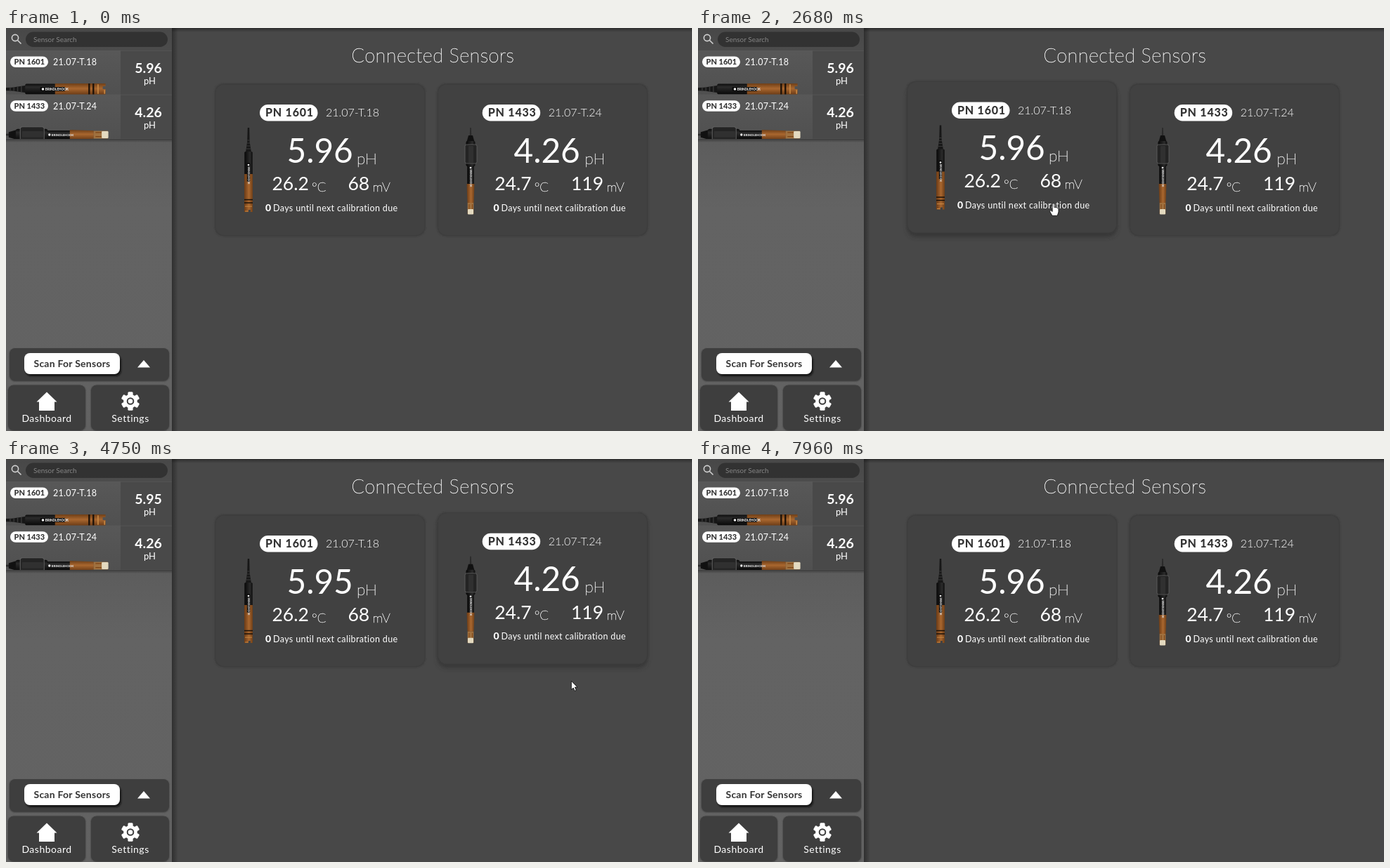
Write an HTML page that moves like this. It is 976 by 574 pixels and loops after 8000 ms.

```html
<!DOCTYPE html>
<html lang="en">
<head>
<meta charset="utf-8">
<title>Connected Sensors</title>
<style>
html, body { margin: 0; height: 100%; overflow: hidden; background: #484848; }
svg { display: block; width: 976px; height: 574px; font-family: Lato, sans-serif; fill: #fff; }
</style>
</head>
<body>
<svg id="stage" viewBox="0 0 976 574" xmlns="http://www.w3.org/2000/svg"></svg>
<script>
const LOOP = 8000, LIFT = 3.7, HOVER_MS = 500;

const text = (x, y, size, weight, str, extra = '') =>
  `<text x="${x}" y="${y}" font-size="${size}" font-weight="${weight}" ${extra}>${str}</text>`;
const thin = (x, y, size, str, extra = '') =>
  text(x, y, size, 200, str, 'stroke="#fff" stroke-width=".45" ' + extra);
const box = (x, y, w, h, r, fill, extra = '') =>
  `<rect x="${x}" y="${y}" width="${w}" height="${h}" rx="${r}" fill="${fill}" ${extra}/>`;
const spaced = n => `letter-spacing="${n}"`;

const defs = `<defs>
  <linearGradient id="side" x2="0" y2="1">
    <stop offset="0" stop-color="#484848"/><stop offset=".27" stop-color="#5c5c5c"/>
    <stop offset=".45" stop-color="#636363"/><stop offset="1" stop-color="#626262"/>
  </linearGradient>
  <linearGradient id="item" x2="0" y2="1">
    <stop offset="0" stop-color="#585858"/><stop offset="1" stop-color="#505050"/>
  </linearGradient>
  <linearGradient id="edge"><stop stop-color="#000" stop-opacity=".35"/><stop offset="1" stop-opacity="0"/></linearGradient>
  <linearGradient id="down" x2="0" y2="1"><stop stop-color="#000" stop-opacity=".35"/><stop offset="1" stop-opacity="0"/></linearGradient>
  <linearGradient id="amber" x2="0" y2="1">
    <stop offset="0" stop-color="#6f3f18"/><stop offset=".45" stop-color="#a9672f"/><stop offset="1" stop-color="#6b3b16"/>
  </linearGradient>
  <linearGradient id="black" x2="0" y2="1">
    <stop offset="0" stop-color="#0b0b0b"/><stop offset=".3" stop-color="#2b2b2b"/><stop offset="1" stop-color="#080808"/>
  </linearGradient>
  <filter id="blur1"><feGaussianBlur stdDeviation="1.3"/></filter>
  <filter id="blur4" x="-10%" y="-10%" width="120%" height="125%"><feGaussianBlur stdDeviation="3"/></filter>
  <clipPath id="clip0"><path d="M0 32H163V95H0z"/></clipPath>
  <clipPath id="clip1"><path d="M0 95H163V158H0z"/></clipPath>
</defs>`;

// Probes lie along x from 0 to about 120, centred on y = 0.
const label = x =>
  `<circle cx="${x}" cy="0" r="1.3"/>` + text(x + 2.4, 1.2, 3.4, 900, 'BRINDLEHOOK', 'fill="#ddd"');
const probes = [
  `<path d="M0 -1.2L20 -1.6L35 -4V4L20 1.8L0 1.2z" fill="#171717"/>
   <path d="M18 -1.6V1.6M22 -2V2M26 -2.6V2.6M30 -3V3" stroke="#3a3a3a"/>
   ${box(34, -5.7, 33, 11.4, 1.5, 'url(#black)')}
   <path d="M66 -6H120V-3H117V0H120V6H66z" fill="url(#amber)"/>
   <path d="M102.5 -6V6M107 -6V6" stroke="#1a1008" stroke-width="1.7"/>
   <path d="M112 -5V5M119 1V5" stroke="#c98a44" stroke-width="1.2"/>
   ${box(50, -2.2, 27, 4.4, 1, '#0c0c0c')}${label(53)}`,
  `<path d="M0 -.8L12 -1.2V1.2L0 .8z" fill="#2a2a2a"/>
   <path d="M11 -3L20 -5.5V5.5L11 3z" fill="#111"/>
   ${box(19, -6.5, 36, 13, 2, 'url(#black)')}
   ${box(24, -9, 27, 17, 2.5, '#242424', 'stroke="#626262" stroke-width=".8"')}
   ${box(26, -4, 24, 7, 1, '#303030')}
   ${box(54, -4.8, 27, 9.6, 1, 'url(#black)')}
   <path d="M80 -5.5L107 -4.5V4.5L80 5.5z" fill="url(#amber)"/>
   <path d="M107 -4.3H123V4.3H107z" fill="#a0713f"/>
   <path d="M109 -2.5H116M109 2H116" stroke="#7c4314"/>
   ${box(116, -4, 7.5, 8, 1, '#e3d9bf')}${label(57)}`
];

const sensors = [
  { pn: 'PN 1601', date: '21.07-T.18', ph: '5.96', temp: '26.2', mv: '68', phX: 399.5, unitX: 499, daysX: 369, probeX: 345, mvX: 487, mvUnitX: 522,
    thumb: 'translate(-18 87) scale(1.33)' },
  { pn: 'PN 1433', date: '21.07-T.24', ph: '4.26', temp: '24.7', mv: '119', phX: 722.5, unitX: 823.5, daysX: 693.5, probeX: 661, mvX: 804.5, mvUnitX: 855,
    thumb: 'translate(-10 152) scale(1.26)' }
];

const listItem = (s, i) => {
  const y = 32 + i * 62.7;
  return box(0, y, 163, 63, 0, 'url(#item)') + box(163, y, 73, 63, 0, '#494949') +
    `<path d="M0 ${y + .5}H236" stroke="#5b5b5b" opacity=".6"/>
     <g clip-path="url(#clip${i})"><g transform="${s.thumb}">${probes[i]}</g></g>` +
    box(6, y + 8.5, 54, 15.5, 7.7, '#fff') +
    text(11.5, y + 20.2, 11, 800, s.pn, 'fill="#333"') +
    text(67, y + 21.2, 12.5, 400, s.date, spaced(.25)) +
    text(202.5, y + 32, 19.5, 700, s.ph, `text-anchor="middle" id="listPh${i}"`) +
    text(204.5, y + 48, 13, 400, 'pH', 'text-anchor="middle"');
};

const card = (s, i) => {
  const dx = i * 316.7, x = 296.7 + dx;
  return `<g id="card${i}">` +
    box(x + 1, 88, 298, 213, 13, '#2c2c2c', `id="shade${i}" filter="url(#blur4)" opacity="0"`) +
    box(x, 79, 300, 217.5, 13, '#3a3a3a', 'filter="url(#blur1)"') +
    box(x + 1.5, 80.5, 297, 214.5, 12, '#414141') +
    `<g transform="translate(${s.probeX} 142) rotate(90)">${probes[i]}</g>` +
    box(361 + dx, 109, 82.5, 23.5, 11.7, '#fff') +
    text(369 + dx, 126.3, 16, 800, s.pn, 'fill="#333" ' + spaced(.8)) +
    text(455 + dx, 126.3, 16, 300, s.date) +
    text(s.phX, 191.7, 47.7, 400, s.ph, `id="ph${i}"`) +
    thin(s.unitX, 193.5, 22.5, 'pH') +
    text(378.5 + dx, 231, 26.5, 400, s.temp) + thin(435 + dx, 232.5, 18.5, '°C') +
    text(s.mvX - .5, 231, 26.5, 400, s.mv, `id="mv${i}"`) + thin(s.mvUnitX - .5, 232.5, 18.5, 'mV') +
    text(s.daysX, 260.5, 14, 800, '0') +
    text(s.daysX + 11, 260.5, 12.5, 400, 'Days until next calibration due', spaced(.36)) + '</g>';
};

const panel = (x, y, w, h) =>
  box(x, y + 1, w, h, 8, '#333', 'filter="url(#blur1)"') + box(x, y, w, h, 8, '#3e3e3e');

const teeth = [0, 60, 120].map(a => box(-3.6, -13.2, 7.2, 26.4, 1.5, '#fff', `transform="rotate(${a})"`)).join('');

document.getElementById('stage').innerHTML = defs +
  box(0, 0, 976, 574, 0, '#484848') + box(236, 0, 740, 6, 0, 'url(#down)') +
  box(236, 0, 9, 574, 0, 'url(#edge)') +
  thin(491.5, 49, 27, 'Connected Sensors', spaced(.5)) +
  sensors.map(card).join('') +
  box(0, 0, 236, 574, 0, 'url(#side)') +
  `<g fill="none" stroke="#d0d0d0" stroke-width="1.6"><circle cx="13" cy="14" r="4.6"/><path d="M16.5 17.5L21.5 22.5"/></g>` +
  box(28, 5.5, 202, 21.5, 10.7, '#323232') +
  text(39, 19.7, 10, 400, 'Sensor Search', 'fill="#858585"') +
  sensors.map(listItem).join('') + box(0, 158, 236, 5, 0, 'url(#down)') +
  panel(5, 456, 227, 46) +
  box(28, 466, 136, 30, 8, '#161616', 'filter="url(#blur1)"') + box(26, 463, 136, 30, 8, '#fff') +
  text(94, 483.3, 14, 700, 'Scan For Sensors', 'text-anchor="middle" fill="#333" ' + spaced(.25)) +
  '<path d="M187 483.5L196 473L205 483.5z"/>' +
  panel(3, 508.5, 110, 64) + panel(121, 508.5, 111, 64) +
  '<path d="M58 518.5L72.5 532.5H69V545H47V532.5H43.5z"/>' +
  `<g transform="translate(177 531.5)">${teeth}<circle r="9.8"/><circle r="4.3" fill="none" stroke="#3e3e3e" stroke-width="2"/></g>` +
  text(58, 561, 14, 400, 'Dashboard', 'text-anchor="middle" ' + spaced(.5)) +
  text(177, 561, 14, 400, 'Settings', 'text-anchor="middle" ' + spaced(.5)) +
  `<g id="cursor" stroke="#111" stroke-width=".9" stroke-linejoin="round">
    <path id="arrow" d="M0 0V12.5L2.8 9.9L4.9 14.3L7 13.3L5 9H8.7z"/>
    <path id="hand" d="M-1.4 1.2Q0 -.8 1.4 1.2V6Q2.7 5 3.6 6.3Q5 5.6 5.7 7Q7.4 6.6 7.5 8.5V12.5L5.8 17.8H-1.5L-4.6 12.5Q-5.6 10 -3.5 10L-1.4 12z"/>
  </g>`;

// Readings: [time, value] steps.
const phSteps = [[0, '5.96'], [440, '5.95'], [1060, '5.96'], [1700, '5.95'], [2330, '5.96'],
  [4220, '5.95'], [5480, '5.96'], [7340, '5.95'], [7960, '5.96']];
const mvSteps = [[0, '68'], [6670, '67'], [7340, '69'], [7960, '68']];
const valueAt = (steps, t) => steps.filter(s => s[0] <= t).pop()[1];

// Pointer: [time, x, y] of its tip.
const path = [[1560, 262, 574], [1840, 293, 475], [2120, 393.5, 376.5], [2320, 452, 296], [2480, 494, 258],
  [2680, 505.5, 249.5], [3010, 505.5, 249.5], [3180, 597, 257], [3265, 614, 259], [3390, 761.5, 258.5],
  [3560, 781, 246], [3760, 784, 238.5], [4430, 784, 238.5], [4690, 799, 296], [5000, 826, 398],
  [5400, 854.5, 475], [5800, 978, 547]];
const hovers = [[2320, 3180], [3265, 4690]];

// CSS "ease" curve, solved by bisection.
function ease(x) {
  if (x <= 0) return 0;
  if (x >= 1) return 1;
  const bezier = (a, b, u) => 3 * a * u * (1 - u) ** 2 + 3 * b * u * u * (1 - u) + u ** 3;
  let lo = 0, hi = 1;
  for (let i = 0; i < 20; i++) {
    const mid = (lo + hi) / 2;
    if (bezier(.25, .25, mid) < x) lo = mid; else hi = mid;
  }
  return bezier(.1, 1, lo);
}

const el = id => document.getElementById(id);
const setText = (id, value) => { if (el(id).textContent !== value) el(id).textContent = value; };
const show = (id, on) => el(id).setAttribute('visibility', on ? 'visible' : 'hidden');

function draw(now) {
  const t = now % LOOP;
  setText('ph0', valueAt(phSteps, t));
  setText('listPh0', valueAt(phSteps, t));
  setText('mv0', valueAt(mvSteps, t));

  hovers.forEach(([on, off], i) => {
    const lift = ease((t - on) / HOVER_MS) - ease((t - off) / HOVER_MS);
    el('card' + i).setAttribute('transform', `translate(0 ${-LIFT * lift})`);
    el('shade' + i).setAttribute('opacity', lift * .65);
  });

  const next = path.findIndex(p => p[0] > t);
  const moving = next > 0;
  const hovering = hovers.some(([on, off]) => t >= on && t < off);
  show('arrow', moving && !hovering);
  show('hand', moving && hovering);
  if (moving) {
    const [t0, x0, y0] = path[next - 1], [t1, x1, y1] = path[next];
    const k = (t - t0) / (t1 - t0);
    el('cursor').setAttribute('transform', `translate(${x0 + (x1 - x0) * k} ${y0 + (y1 - y0) * k})`);
  }
  requestAnimationFrame(() => draw(performance.now()));
}
draw(performance.now());
</script>
</body>
</html>
```
